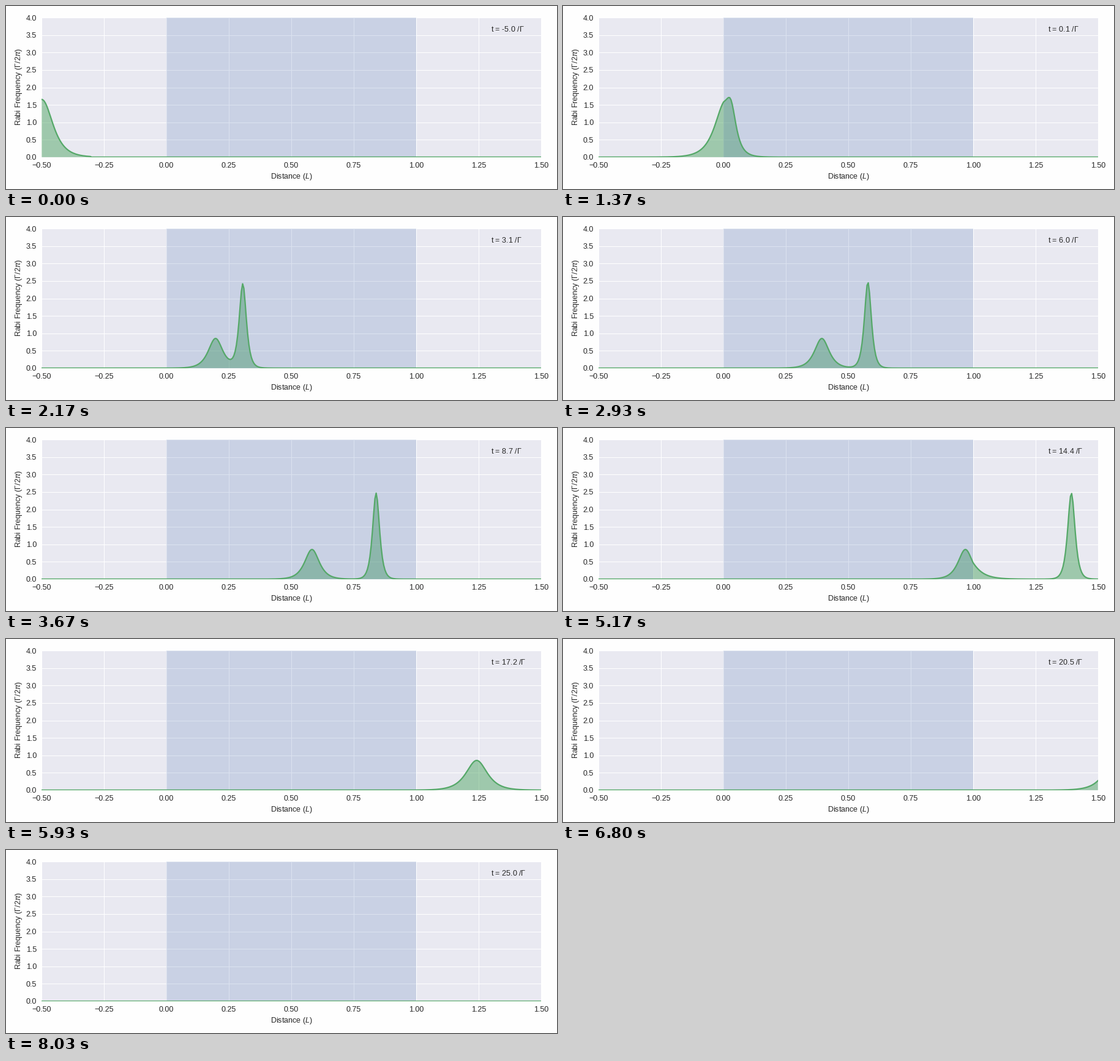
Animation, 900 px wide and 300 px high, one loop 8060 ms. Source, as a matplotlib script:

```python
import numpy as np
import matplotlib.pyplot as plt
from matplotlib.animation import FuncAnimation

W, H, DPI = 900, 300, 100
LOOP_MS, FRAMES = 8060, 242
T_START, T_END, T_STEP = -5.0, 25.0, 0.125

C = 0.1            # vacuum speed
TAU = 0.372        # width of the slow soliton
RATIO = 2.94       # slow to fast soliton width
DELAY = 4.56       # delay of the slow soliton across the medium
BLUR = 0.042       # half-width of the time sampling
T_ON = -2.0        # retarded time at which the field switches on

INK, PANEL, GREEN, BLUE = "#262626", "#e9e9f1", "#55a868", "#4c72b0"
LEFT, RIGHT, BOTTOM, TOP = 58.3, 873.7, 52.2, 280.7

plt.rcParams.update({
    "font.family": "Liberation Sans",
    "font.size": 9,
    "mathtext.fontset": "custom",
    "mathtext.rm": "Liberation Sans",
    "mathtext.it": "Liberation Sans:italic",
    "text.color": INK,
})


def pulse_area(ret, depth):
    """Two-soliton sine-Gordon solution: area swept up to retarded time ret."""
    slow = (ret - DELAY * depth) / TAU
    fast = (RATIO * ret - DELAY * depth / RATIO) / TAU
    e1, e2 = np.exp(fast), np.exp(slow)
    mix = (RATIO + 1) / (RATIO - 1)
    return 4 * np.arctan2(mix * (e1 + e2), 1 - e1 * e2)


def rabi(x, t):
    ret = t - x / C
    depth = np.clip(x, 0, 1)
    omega = (pulse_area(ret + BLUR, depth) - pulse_area(ret - BLUR, depth)) / (2 * BLUR)
    return np.where(ret >= T_ON, np.abs(omega) / (2 * np.pi), 0)


fig = plt.figure(figsize=(W / DPI, H / DPI), dpi=DPI, facecolor="#fefefe")
ax = fig.add_axes([LEFT / W, BOTTOM / H, (RIGHT - LEFT) / W, (TOP - BOTTOM) / H],
                  facecolor=PANEL)
ax.set(xlim=(-0.5, 1.5), ylim=(0, 4))
xticks = np.arange(-0.5, 1.51, 0.25)
ax.set_xticks(xticks, [f"{v:.2f}".replace("-", "\u2212") for v in xticks])
ax.set_yticks(np.arange(0, 4.1, 0.5))
ax.yaxis.set_major_formatter("{x:.1f}")
ax.tick_params(length=0, pad=6, labelcolor=INK)
ax.set_axisbelow(True)
ax.grid(color="white", lw=0.72)
for spine in ax.spines.values():
    spine.set_visible(False)

fig.text(466 / W, 17 / H, "Distance ($L$)", ha="center", va="baseline")
fig.text(24.5 / W, 167.5 / H, r"Rabi Frequency (Γ/2$\pi$)", rotation=90,
         rotation_mode="anchor", ha="center", va="baseline")

x = np.linspace(-0.5, 1.5, 401)
fill, = ax.fill([0, 0, 0], [0, 0, 0], color=GREEN, alpha=0.5, lw=0)
ax.axvspan(0, 1, color=BLUE, alpha=0.2, lw=0)
line, = ax.plot([], [], color=GREEN, lw=1.6)
clock = ax.text(1.3, 3.61, "")


def draw(i):
    t = min(T_START + i * T_STEP, T_END)
    y = rabi(x, t)
    line.set_data(x, y)
    fill.set_xy(np.column_stack([np.r_[x[0], x, x[-1]], np.r_[0, y, 0]]))
    # ties round toward zero
    clock.set_text(rf"t = {t * (1 - 1e-12):.1f} /$\Gamma$")
    return fill, line, clock


anim = FuncAnimation(fig, draw, frames=FRAMES, init_func=lambda: draw(0),
                     interval=LOOP_MS / FRAMES, repeat=True, repeat_delay=0)
plt.show()
```
